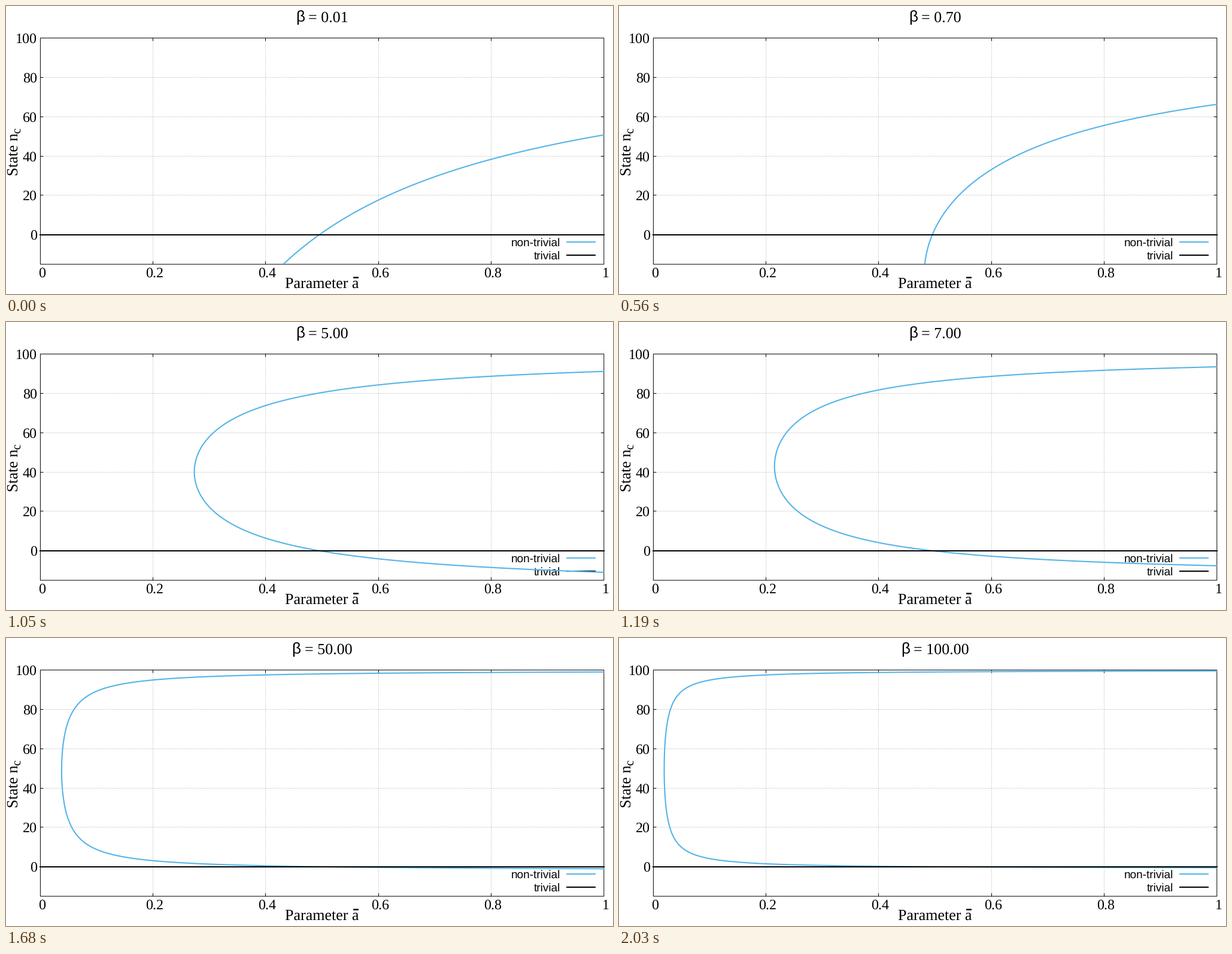
Write a matplotlib script that moves like this. It is 1014 px wide and 482 px high and loops after 2100 ms.

```python
import numpy as np
import matplotlib.pyplot as plt
from matplotlib.animation import FuncAnimation
from matplotlib.patches import Rectangle

W, H, DPI = 1014, 482, 64
LEFT, RIGHT, TOP, BOTTOM = 57.4, 998.8, 53.6, 432.2
N_MIN, N_MAX = -15, 100
BLUE, GREY = "#56b4e9", "#a6a6a6"
SERIF, SANS = "Liberation Serif", "Liberation Sans"
TITLE, TICK = 26, 5

# one to nine within each decade, with a coarse start
BETAS = ([0.01, 0.05] + [k / 10 for k in range(1, 10)]
         + list(range(1, 10)) + list(range(10, 101, 10)))

plt.rcParams["text.hinting"] = "no_hinting"
fig = plt.figure(figsize=(W / DPI, H / DPI), dpi=DPI, facecolor="white")
ax = fig.add_axes([0, 0, 1, 1])
ax.set_xlim(0, W)
ax.set_ylim(H, 0)
ax.axis("off")


def pt(px):
    return px * 72 / DPI


def px_x(a):
    return LEFT + (RIGHT - LEFT) * a


def px_y(n):
    return BOTTOM - (BOTTOM - TOP) * (n - N_MIN) / (N_MAX - N_MIN)


def centre(v):
    """Middle of the pixel that holds v."""
    return np.floor(v) + 0.5


def line(xs, ys, color="black", width=1, z=2, **kw):
    return ax.plot(xs, ys, color=color, lw=pt(width), zorder=z, snap=False,
                   solid_capstyle="butt", dash_capstyle="butt", **kw)[0]


def label(x, y, text, size, ha="left", font=SERIF, **kw):
    return ax.text(x, y, text, fontsize=pt(size), family=font, ha=ha,
                   va="baseline", zorder=3, **kw)


def draw_axes():
    for k in range(6):
        x = centre(px_x(k / 5))
        label(x + 3, 454.5, f"{k / 5:g}", 24, "center")
        if 0 < k < 5:
            line([x, x], [TOP, BOTTOM], GREY, z=1, dashes=(1, 2))
            line([x, x], [TOP, TOP + TICK])
            line([x, x], [BOTTOM, BOTTOM - TICK])
    for n in range(0, 101, 20):
        y = centre(px_y(n))
        label(52, y + 9, str(n), 24, "right")
        if n < 100:
            line([LEFT, RIGHT], [y, y], GREY, z=1, dashes=(1, 2))
            line([LEFT, LEFT + TICK], [y, y])
            line([RIGHT, RIGHT - TICK], [y, y])
    ax.add_patch(Rectangle((LEFT, TOP), RIGHT - LEFT, BOTTOM - TOP, snap=False,
                           fill=False, lw=pt(1), ec="black", zorder=2))


def draw_labels():
    label(528, 471.4, "Parameter a", TITLE, "center")
    line([580, 589], [454.5, 454.5], width=2.4)
    up = dict(rotation=90, rotation_mode="anchor")
    label(20, 284, "State n", TITLE, **up)
    label(25, 213, "c", 20.5, **up)
    for text, y, color in (("non-trivial", 395, BLUE), ("trivial", 417, "black")):
        label(926.5, y + 7, text, 19, "right", SANS)
        line([936, 985], [y, y], color, 2, z=4)


draw_axes()
draw_labels()
line([56, 1000], [np.round(px_y(0))] * 2, width=2, z=5)
curve = line([], [], BLUE, 2.1, z=4)
curve.set_clip_path(Rectangle((LEFT, TOP), RIGHT - LEFT + 0.5, BOTTOM - TOP,
                              transform=ax.transData))
beta_sign = label(0, 27, "β", TITLE, font=SANS)
beta_text = label(0, 27, "", TITLE)


def branch(beta):
    """Non-trivial states n with the parameter a that balances each one."""
    n = np.linspace(N_MIN - 1, N_MAX - 0.01, 4000)
    gain = (1 - n / 100) * (1 + beta * n / 99)
    keep = gain > 0.3
    return 0.495 / gain[keep], n[keep]


def update(i):
    beta = BETAS[i]
    a, n = branch(beta)
    curve.set_data(px_x(a), px_y(n))
    value = f"{beta:.2f}"
    sign_w = 0.575 * TITLE
    total = sign_w + (1.064 + 0.5 * (len(value) - 1) + 0.25) * TITLE
    x = 528 - total / 2
    beta_sign.set_x(x)
    beta_text.set_text("= " + value)
    beta_text.set_x(x + sign_w + 0.25 * TITLE)
    return curve, beta_sign, beta_text


anim = FuncAnimation(fig, update, frames=len(BETAS), interval=70,
                     init_func=lambda: update(0), repeat=True, repeat_delay=0)
plt.show()
```
